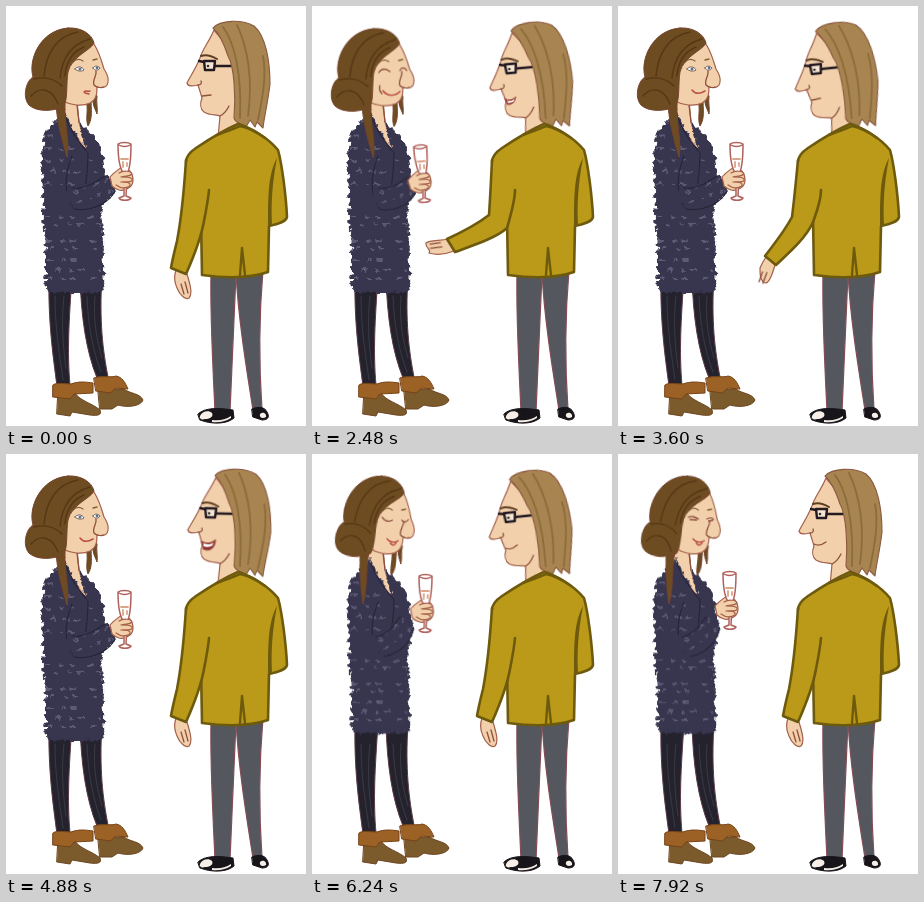
Recreate the animation shown at these times as an HTML page without scripts. Size 300x420 px, loop 8 s.

```html
<!DOCTYPE html>
<html lang="en">
<head>
<meta charset="utf-8">
<title>Small talk</title>
<style>
html, body { margin: 0; width: 100%; height: 100%; overflow: hidden; background: #fff; }
svg { display: block; width: 100vw; height: 100vh; }
path { stroke-linecap: round; stroke-linejoin: round; }
.line { fill: none; stroke: #8c5140; stroke-width: 1.3; }
.skin { fill: #f2d0ab; stroke: #a3604b; stroke-width: 1.2; }
.lip { fill: none; stroke: #b9503f; stroke-width: 1.5; }
.open { fill: #8d3430; stroke: #a3524a; stroke-width: 1; }
.teeth { fill: #fff; }
.hair { fill: #6d4c22; stroke: #75432c; stroke-width: 1; }
.hair.him { fill: #a88450; stroke: #8b5940; stroke-width: 1.1; }
.lock { fill: none; stroke: #553713; stroke-width: 1.4; }
.lock.him { stroke: #8b6c3c; stroke-width: 1.8; }
.coat { fill: #38354f; stroke: #38354f; }
.tuft { fill: none; stroke: #5d5a76; stroke-width: 2; }
.fold { fill: none; stroke: #262439; stroke-width: 1.1; }
.jacket { fill: #ba9a18; stroke: #6e5a0d; stroke-width: 2.6; }
.seam { fill: none; stroke: #6e5a0d; stroke-width: 2.4; }
.pants { fill: #54575e; stroke: #824e55; stroke-width: 1.2; }
.tights { fill: #24232d; stroke: #5b3943; stroke-width: 1; }
.boot { fill: #7b5a2c; stroke: #6b4420; stroke-width: 1; }
.cuff { fill: #9b6125; stroke: #774317; stroke-width: 1; }

/* 1% = 80 ms */
.a { animation: 8s linear infinite; }
.f { opacity: 0; animation: 8s step-end infinite; }

.her-head { transform-origin: 65px 102px; animation-name: her-head; }
@keyframes her-head {
  0%, 18%, 39%, 67%, 100% { transform: none; }
  22%, 30%, 36% { transform: translateY(1px); }
  26%, 33% { transform: rotate(-1deg); }
  71%, 90% { transform: rotate(5deg) scaleX(.94); }
  93% { transform: rotate(3.5deg) scaleX(.95); }
  95%, 99.99% { transform: rotate(5deg) scaleX(.94); }
}
.strand { transform-origin: 55px 100px; animation-name: strand; }
@keyframes strand {
  0%, 67%, 100% { transform: none; }
  71%, 99.99% { transform: translateX(-3px) rotate(4deg); }
}
.coat-body { transform-origin: 65px 105px; animation-name: coat-body; }
@keyframes coat-body {
  0%, 67%, 100% { transform: none; }
  71%, 99.99% { transform: scaleY(.96); }
}
.sleeve { transform-origin: 68px 190px; animation-name: sleeve; }
@keyframes sleeve {
  0%, 5%, 44%, 67%, 100% { transform: none; }
  9%, 40% { transform: rotate(3deg) scaleX(.86); }
  71%, 99.99% { transform: rotate(-18deg) scaleX(.9); }
}
.glass { transform-origin: 116px 172px; animation-name: glass; }
@keyframes glass {
  0%, 5%, 44%, 67%, 100% { transform: none; }
  9%, 22%, 40% { transform: translate(-8px, 1px) rotate(-4deg); }
  25%, 31%, 37% { transform: translate(-8px, 2.5px) rotate(-4deg); }
  28%, 34% { transform: translate(-8px, 1.5px) rotate(-4deg); }
  71%, 78% { transform: translate(-5.5px, -16px) rotate(1deg); }
  82%, 99.99% { transform: translate(-7px, -19px) rotate(0deg); }
}

.eyes-open { animation-name: eyes-open; }
@keyframes eyes-open { 0%, 39%, 54% { opacity: 1; } 19%, 53%, 69% { opacity: 0; } }
.glad { animation-name: glad; }
@keyframes glad { 0%, 39% { opacity: 0; } 19% { opacity: 1; } }
.eyes-down { animation-name: eyes-down; }
@keyframes eyes-down { 0%, 54%, 82% { opacity: 0; } 53%, 69% { opacity: 1; } }
.eyes-half { animation-name: eyes-half; }
@keyframes eyes-half { 0% { opacity: 0; } 82% { opacity: 1; } }

.her-calm { animation-name: her-calm; }
@keyframes her-calm { 0%, 7%, 11% { opacity: 1; } 5%, 9%, 13% { opacity: 0; } }
.her-talk { animation-name: her-talk; }
@keyframes her-talk { 0%, 7%, 11%, 14%, 86%, 89% { opacity: 0; } 5%, 9%, 13%, 84%, 87% { opacity: 1; } }
.her-smile { animation-name: her-smile; }
@keyframes her-smile { 0%, 19%, 67% { opacity: 0; } 14%, 39% { opacity: 1; } }
.her-lips { animation-name: her-lips; }
@keyframes her-lips { 0%, 84%, 87% { opacity: 0; } 67%, 86%, 89% { opacity: 1; } }

.his-head { transform-origin: 235px 115px; animation-name: his-head; }
@keyframes his-head {
  0%, 17%, 48%, 52%, 56%, 67%, 82%, 100% { transform: none; }
  23%, 28%, 34%, 38%, 45% { transform: rotate(-6deg); }
  31%, 36% { transform: rotate(-5deg); }
  47% { transform: rotate(-4deg); }
  54%, 59%, 62% { transform: rotate(1.2deg); }
  72%, 79% { transform: rotate(-6deg); }
}
.his-calm { animation-name: his-calm; }
@keyframes his-calm { 0%, 39% { opacity: 1; } 12%, 51% { opacity: 0; } }
.his-frown { animation-name: his-frown; }
@keyframes his-frown { 0%, 23% { opacity: 0; } 12% { opacity: 1; } }
.his-grin { animation-name: his-grin; }
@keyframes his-grin {
  0%, 26%, 33%, 39%, 53%, 58%, 67% { opacity: 0; }
  23%, 28%, 35%, 51%, 56%, 63% { opacity: 1; }
}
.his-talk { animation-name: his-talk; }
@keyframes his-talk {
  0%, 28%, 35%, 56%, 63% { opacity: 0; }
  26%, 33%, 53%, 58% { opacity: 1; }
}
.his-smile { animation-name: his-smile; }
@keyframes his-smile { 0% { opacity: 0; } 67% { opacity: 1; } }

.his-arm { animation-name: his-arm; }
@keyframes his-arm {
  0%, 18%, 48%, 100% { d: path("M180 154C178 185 175 214 171 235C168 247 166 256 165 262L180 268C188 250 195 232 198 215C200 205 202 195 203 184"); }
  23%, 40% { d: path("M180 154C179 175 178 195 177 209C164 219 148 227 135 233L143 246C162 239 184 232 195 222C199 208 203 195 203 184"); }
  44%, 47% { d: path("M180 154C178 175 176 195 174 211C166 226 156 238 147 250L158 259C172 246 188 232 195 216C199 205 203 195 203 184"); }
}
.his-hand { animation-name: his-hand; }
@keyframes his-hand {
  0%, 18%, 48%, 100% { d: path("M170 264L181 268C184 278 187 288 183 292C180 294 174 290 171 282C168 276 168 270 170 264"); }
  23%, 40% { d: path("M137 233L142 245C132 249 124 249 117 247C120 244 113 242 114 237C118 234 126 235 137 233"); }
  44%, 47% { d: path("M148 251L157 259C155 266 152 276 148 277C142 276 142 268 142 262C144 257 146 254 148 251"); }
}
.his-fingers { transform-origin: 177px 268px; animation-name: his-fingers; }
@keyframes his-fingers {
  0%, 18%, 48%, 100% { transform: none; }
  23%, 40% { transform: translate(-39px, -28px) rotate(98deg); }
  44%, 47% { transform: translate(-25px, -9px) rotate(36deg); }
}
</style>
</head>
<body>
<svg viewBox="0 0 300 420" preserveAspectRatio="none">
<defs>
  <filter id="fuzz" x="-15%" y="-15%" width="130%" height="130%" color-interpolation-filters="sRGB">
    <feTurbulence type="fractalNoise" baseFrequency=".2" numOctaves="2" seed="4"/>
    <feDisplacementMap in="SourceGraphic" scale="7" xChannelSelector="R" yChannelSelector="G"/>
  </filter>
</defs>

<g id="woman">
  <path class="tights" d="M43 270C42 315 47 350 51 380L64 379C61 345 63 315 66 270Z"/>
  <path class="tights" d="M74 270C75 310 80 345 91 372L102 371C97 345 93 315 96 270Z"/>
  <path fill="none" stroke="#3a3a45" d="M49 290C49 325 54 350 57 374M58 290C55 315 57 340 60 362M81 290C82 320 87 345 95 366M89 290C87 315 91 335 96 352"/>
  <path class="boot" d="M92 383L118 383C124 388 134 387 137 394C135 400 122 402 112 399L106 403L94 403Z"/>
  <path class="cuff" d="M88 372C96 369 106 372 110 370C116 371 119 376 122 383L110 382L104 387L90 385Z"/>
  <path class="boot" d="M52 390L69 387C74 395 86 397 94 404C96 409 92 410 84 409L66 406L64 410L51 408Z"/>
  <path class="cuff" d="M47 379C51 376 58 378 65 378C73 375 80 376 87 377L87 387L68 388L64 393L47 391Z"/>

  <path class="skin" stroke="none" d="M56 90L71 94L73 116L82 147L54 108Z"/>
  <path class="line" d="M71 99L73 116"/>
  <g class="a coat-body">
    <g filter="url(#fuzz)">
      <path class="coat" d="M58 105C52 114 43 119 39 130C36 160 37 200 40 232C41 255 40 270 41 285C58 287 80 287 97 285C97 262 95 240 95 206C101 180 98 156 94 141C88 130 80 122 73 116L82 147C72 134 64 120 58 105Z"/>
      <path class="coat" fill-opacity="0" stroke-width="3" stroke-dasharray="1 7" d="M40 126C35 150 36 195 39 232L40 284H97L96 215"/>
      <path class="tuft" stroke-dasharray="4 10 3 6 5 15" d="M42 130L54 128M40 143H68M40 155L92 154M45 165L95 167M40 178H76M40 211H92M48 219L94 217M41 235H90M44 243H94M42 254H80M50 264H94M42 273H94"/>
    </g>
    <path class="fold" d="M59 110C65 126 74 138 82 147C82 170 78 190 76 204M66 150C58 170 58 190 67 202"/>
  </g>
  <g class="a sleeve">
    <g filter="url(#fuzz)">
      <path class="coat" d="M62 180C76 183 88 176 98 169L111 178C109 190 98 201 84 204C70 205 60 200 60 190Z"/>
      <path class="tuft" stroke-dasharray="4 7 2 9" d="M68 186L104 174M72 196L106 184"/>
    </g>
    <path class="fold" d="M66 182C78 184 90 176 99 170M68 203C86 206 104 196 109 185"/>
  </g>
  <g class="a glass">
    <path class="skin" d="M104 171C108 166 112 164 116 161L124 165C128 170 128 178 124 181C117 187 110 184 106 180Z"/>
    <path fill="#fff" stroke="#b0605a" stroke-width="1.5" d="M112 138C115 136 122 136 125 138C125 152 124 163 121 168L120 190L125 192C123 195 115 195 113 192L118 190L118 168C113 162 112 150 112 138ZM113 139C116 141 121 141 124 139"/>
    <path fill="none" stroke="#dba58c" stroke-width="1.8" d="M115 153L122 153M117 156L117 161M121 157L121 160"/>
    <path class="skin" d="M113 167C118 164 125 165 126 168C123 171 119 170 115 171C121 171 127 171 126 175C122 177 119 175 115 176C120 176 125 176 124 180C119 183 114 182 110 179"/>
  </g>

  <g class="a her-head">
    <path class="a strand hair" d="M50 98C51 116 56 134 61 151C64 138 58 116 59 98Z"/>
    <path class="hair" d="M80 94C83 104 79 112 82 120C87 112 85 104 85 93ZM87 90C86 99 89 102 91 108C92 102 90 97 91 90Z"/>
    <path class="skin" d="M58 50C70 36 85 32 88 38C93 46 96 56 98 63C102 69 103 75 101 79C99 82 95 82 91 81C91 87 91 93 84 97C76 101 64 99 57 95Z"/>
    <path class="line" d="M90 65C91 70 86 74 88 79C90 81 94 82 97 81"/>
    <path class="line" style="stroke:#80602f" d="M67 56C70 53 74 53 77 55M87 54L91 53"/>
    <g class="f eyes-open">
      <path fill="#fff" stroke="#6c5143" stroke-width=".9" d="M69 63C71 60 76 60 78 64C75 66 71 65 69 63ZM87 62C89 59 92 60 94 62C92 65 89 65 87 62Z"/>
      <circle cx="74" cy="63" r="1.5" fill="#596f8c"/><circle cx="91" cy="62" r="1.4" fill="#596f8c"/>
    </g>
    <path class="f glad line" d="M67 66C70 61 75 62 78 65M88 64C90 60 93 61 95 64M68 79C67 82 68 85 70 87"/>
    <path class="f eyes-down line" d="M67 63C70 67 75 67 78 65M88 64C90 67 93 66 95 63"/>
    <path class="f eyes-half line" d="M67 63C70 61 75 62 78 64M69 65L76 65M87 63C90 61 92 61 94 63M89 65L93 64"/>
    <path class="f her-calm lip" d="M78 86C80 84 82 86 84 85M79 87L83 88"/>
    <path class="f her-talk open" d="M77 85C80 83 84 84 86 86C84 92 79 91 77 85Z"/>
    <path class="f her-smile lip" d="M74 84C77 88 82 88 87 85"/>
    <path class="f glad lip" d="M71 84C75 90 83 90 88 85"/>
    <path class="f her-lips lip" d="M74 84C77 87 82 88 86 85M78 88C80 91 83 90 84 87"/>
    <path class="hair" d="M62 22C75 21 86 28 88 37C84 45 66 50 62 66C60 78 62 92 58 100C48 106 30 106 23 99C16 91 20 75 27 71C22 54 34 24 62 22Z"/>
    <path class="lock" d="M84 33C66 38 56 50 54 72M72 26C50 30 40 48 38 70M28 73C40 70 50 74 56 80M25 90C34 80 46 82 52 98M78 41C66 46 60 56 59 70"/>
  </g>
</g>

<g id="man">
  <path class="pants" d="M205 266C204 310 207 360 209 406L224 406C226 360 228 310 230 268Z"/>
  <path class="pants" d="M230 266C232 310 240 360 247 404L256 404C253 360 253 310 257 264Z"/>
  <path fill="#171519" stroke="#171519" d="M192 408C199 401 214 402 227 404L228 412C220 419 204 418 194 414Z"/>
  <path fill="#171519" stroke="#171519" d="M246 403C252 400 259 401 261 406C264 411 262 414 256 414L247 411Z"/>
  <path fill="#f5efe7" d="M194 410C196 405 203 404 206 407C208 411 203 413 199 413C196 414 193 413 194 410ZM206 414C213 415 219 414 225 410L225 412C219 416 211 417 206 416ZM254 408C257 405 261 408 260 411C257 413 253 412 254 408Z"/>

  <g class="a his-head">
    <path class="skin" d="M208 24C203 36 196 44 194 52C190 62 184 71 181 77C182 81 187 80 192 79C194 85 195 89 196 92C194 97 194 103 198 106C204 110 211 108 214 110L212 132L236 128L238 60Z"/>
    <path class="line" d="M192 79C195 79 196 77 195 75M214 110C218 108 221 104 223 100"/>
    <path fill="none" stroke="#5d4024" stroke-width="2" d="M195 50C200 48 206 50 211 53"/>
    <path fill="#f6e6d3" stroke="#231a22" stroke-width="2.4" d="M198 55L209 55L208 64L199 64Z"/>
    <path fill="none" stroke="#231a22" stroke-width="2.4" d="M193 55L198 56M209 60L225 60"/>
    <circle cx="202" cy="60" r="1.3" fill="#33302f"/>
    <path class="f his-calm line" d="M196 90L205 89"/>
    <path class="f his-frown line" d="M196 91C199 89 202 90 204 92M197 50L204 53"/>
    <g class="f his-grin">
      <path class="open" d="M195 89C198 92 203 91 206 88C205 94 201 96 197 95Z"/>
      <path class="teeth" d="M197 91C200 93 203 91 205 90L203 93L198 94Z"/>
    </g>
    <g class="f his-talk">
      <path class="open" d="M195 88C200 91 205 90 209 86C209 95 203 99 197 96Z"/>
      <path class="teeth" d="M197 90C201 92 205 91 207 89L206 92C203 94 200 94 197 93Z"/>
    </g>
    <path class="f his-smile line" d="M196 90C200 92 204 91 208 88"/>
    <path class="hair him" d="M207 22C214 14 236 13 248 20C260 30 264 56 264 78C262 96 258 112 257 122L251 116L249 121L244 114L240 121C234 116 230 118 228 112C230 90 228 60 222 50C218 38 214 28 207 22Z"/>
    <path class="lock him" d="M217 21C228 36 236 66 234 112M231 19C242 42 247 74 242 110M257 50C261 70 256 94 252 114"/>
  </g>

  <path class="jacket" d="M195 212L196 269C218 272 242 273 262 266L263 220C272 218 280 216 281 211C280 190 276 158 272 144C262 132 246 122 232 118C218 124 202 134 190 142C184 146 180 150 180 156"/>
  <path class="seam" d="M236 242L234 269M236 242L239 269M211 129C222 125 230 122 234 120C244 122 252 127 259 132"/>
  <path fill="#6e5a0d" d="M271 152C262 168 262 190 262 222L266 219C265 198 266 178 271 152Z"/>
  <path class="a his-hand skin" d="M170 264L181 268C184 278 187 288 183 292C180 294 174 290 171 282C168 276 168 270 170 264"/>
  <path class="a his-fingers line" d="M175 278L178 288M179 276L182 287"/>
  <path class="a his-arm jacket" d="M180 154C178 185 175 214 171 235C168 247 166 256 165 262L180 268C188 250 195 232 198 215C200 205 202 195 203 184"/>
</g>
</svg>
</body>
</html>
```
